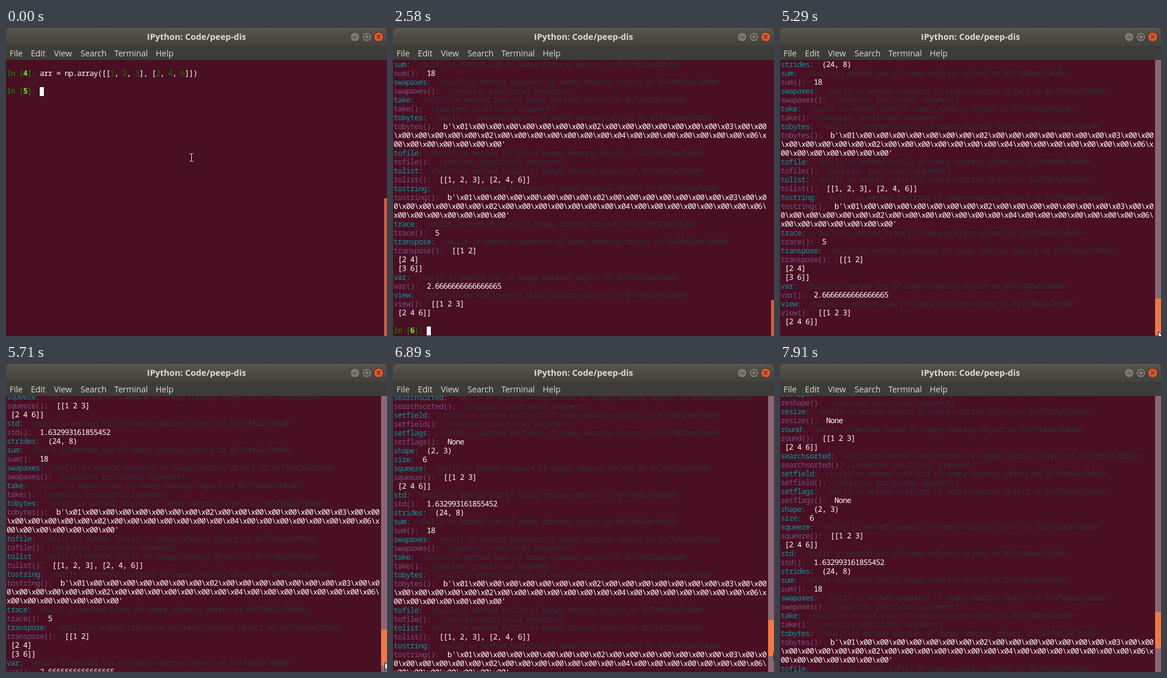
These frames come from a looping animation (644 by 521 pixels, 8000 ms). An HTML page:

```html
<!DOCTYPE html>
<html lang="en">
<head>
<meta charset="utf-8">
<title>IPython terminal</title>
<style>
  html, body { margin: 0; width: 644px; height: 521px; overflow: hidden; background: #490f23; }
  #win { position: relative; width: 644px; height: 521px; overflow: hidden; background: #490f23; }
  #bar { position: absolute; inset: 0 0 auto; height: 54px; background: #7c2a24; font-family: "Open Sans", "Noto Sans", sans-serif; color: #dfdbd2; }
  #chrome { position: absolute; inset: 0; border-radius: 7px 7px 0 0; background: linear-gradient(#66645c 0, #55534b 2px, #43423d 29px, #3d3c38 31px, #3c3b37 54px); }
  #title { position: absolute; left: 0; width: 644px; top: 5px; text-align: center; font-weight: 700; font-size: 14.5px; line-height: 20px; }
  .menu { position: absolute; top: 33px; font-size: 14px; line-height: 20px; }
  #bar svg { position: absolute; left: 580px; top: 5px; }
  #term { position: absolute; left: 0; top: 54px; width: 644px; height: 466px; overflow: hidden; }
  pre { position: absolute; left: 1px; top: 0; margin: 0; color: #fff; font: 500 13px/15px "Noto Sans Mono", "DejaVu Sans Mono", monospace; letter-spacing: -.8px; text-rendering: geometricPrecision; }
  pre div { height: 15px; white-space: pre; }
  .key { color: #06989a; }
  .call { color: #75507b; }
  .dim { color: #2e3436; }
  .in { color: #009900; }
  .in b { color: #8ae234; }
  .num { color: #008000; }
  .pair { background: #aacccc; color: #000; }
  .caret { position: relative; top: 1px; display: inline-block; width: 7px; height: 15px; background: #fff; vertical-align: top; }
  #trough { position: absolute; right: 0; top: 54px; width: 10px; height: 467px; background: #8c6773; }
  #thumb { position: absolute; right: 0; }
  #beam, #arrow { position: absolute; overflow: visible; }
  #beam { left: 309px; top: 211px; }
</style>
</head>
<body>
<div id="win">
  <div id="term"><pre id="input"></pre><pre id="output"></pre></div>
  <div id="trough"></div>
  <div id="thumb"></div>
  <div id="bar">
    <div id="chrome"></div>
    <div id="title">IPython: Code/peep-dis</div>
    <svg width="60" height="20" fill="none" stroke="#35342f">
      <g fill="#7b7870"><circle cx="10" cy="10" r="8"/><circle cx="30" cy="10" r="8"/></g>
      <circle cx="50" cy="10" r="8" fill="#e9562b"/>
      <path d="M6.5 10.5h7M26.5 6.5h7v7h-7zM47 7l6 6M53 7l-6 6" stroke-width="1.2"/>
    </svg>
  </div>
  <svg id="beam" width="9" height="16" fill="none">
    <path d="M1.5 1.5H4L4.5 2L5 1.5H7.5M4.5 2V14M1.5 14.5H4L4.5 14L5 14.5H7.5" stroke="#111" stroke-width="3"/>
    <path d="M1.5 1.5H4L4.5 2L5 1.5H7.5M4.5 2V14M1.5 14.5H4L4.5 14L5 14.5H7.5" stroke="#fff"/>
  </svg>
  <svg id="arrow" width="12" height="18">
    <path d="M.5 .5V14L3.7 11L6 16.5L8.2 15.5L6 10.3H10.3Z" fill="#fff" stroke="#111"/>
  </svg>
</div>
<script>
const $ = id => document.getElementById(id);
const LOOP = 8000, COLS = 90, ROW = 15, ROWS_ABOVE = 21;
const SCROLL_RATIO = 7.6;   // text pixels per thumb pixel

const esc = s => s.replace(/&/g, '&amp;').replace(/</g, '&lt;');
const span = (cls, s) => `<span class="${cls}">${esc(s)}</span>`;
const row = html => `<div>${html}</div>`;
const prompt = n => `<span class="in">In [<b>${n}</b>]: </span>`;
const caret = '<span class="caret"></span>';

// Menu
const menu = { File: 6, Edit: 42, View: 81, Search: 126, Terminal: 183, Help: 253 };
for (const name in menu)
  $('bar').insertAdjacentHTML('beforeend', `<span class="menu" style="left:${menu[name]}px">${name}</span>`);

// Output listing
const NEEDS_ARG = '(requires positional argument)';
const matrix = '[[1 2 3]\n [2 4 6]]';
const bytes = "b'" + [1, 2, 3, 2, 4, 6].map(n => '\\x0' + n + '\\x00'.repeat(7)).join('') + "'";
const methods = [
  ['reshape'], ['resize', 'None'], ['round', matrix], ['searchsorted'], ['setfield'],
  ['setflags', 'None'], ['shape', '(2, 3)', true], ['size', '6', true], ['squeeze', matrix],
  ['std', '1.632993161855452'], ['strides', '(24, 8)', true], ['sum', '18'], ['swapaxes'],
  ['take'], ['tobytes', bytes], ['tofile'], ['tolist', '[[1, 2, 3], [2, 4, 6]]'],
  ['tostring', bytes], ['trace', '5'], ['transpose', '[[1 2]\n [2 4]\n [3 6]]'],
  ['var', '2.6666666666666665'], ['view', matrix]
];

function entry(cls, label, value, valueCls) {
  const head = label + ':  ';
  return (head + value).split('\n')
    .flatMap(line => line.match(new RegExp(`.{1,${COLS}}`, 'g')))
    .map((line, i) => row(i ? span(valueCls, line)
      : span(cls, head) + span(valueCls, line.slice(head.length))))
    .join('');
}

const listing = methods.map(([name, value, isField]) => {
  if (isField) return entry('key', name, value, '');
  const about = `<built-in method ${name} of numpy.ndarray object at 0x7fdd2ae7b8a0>`;
  return entry('key', name, about, 'dim') +
    entry('call', name + '()', value || NEEDS_ARG, value ? '' : 'dim');
}).join('');
$('output').innerHTML = listing + row('') + row(prompt(6) + caret);
const outCaret = $('output').querySelector('.caret');

const code = 'arr = np.array([[1, 2, 3], [2, 4, 6]])'.replace(/\d/g, d => span('num', d));
const typedRow = text => {
  const body = text.endsWith(')') ? text.replace(/[()]/g, c => span('pair', c)) : text;
  return row('') + row(prompt(4) + code) + row('') + row(prompt(5) + body + caret);
};

// Timelines: [start, value]
const typing = [[0, ''], [780, 'p'], [920, 'pe'], [1040, 'pee'], [1160, 'peep'],
  [1440, 'peep('], [1730, 'peep(ar'], [1880, 'peep(arr'], [2180, 'peep(arr)']];
const blink = [[0, 1], [3140, 0], [3700, 1], [4340, 0], [4890, 1]];
const hover = [[0, 0], [4100, .35], [4220, .7], [4340, 1]];
const drag = [[0, 0], [5290, 2], [5440, 5], [5590, 8], [5710, 11], [5830, 13], [5950, 15],
  [6100, 17], [6220, 18], [6360, 20], [6500, 22], [6650, 24], [6770, 25], [6890, 27],
  [7040, 29], [7190, 31], [7370, 33], [7500, 35], [7650, 37], [7790, 38], [7910, 40]];
const pointerX = [[0, 644], [4100, 642], [4220, 640], [4340, 639], [4460, 638],
  [5290, 639], [5710, 639.5], [6220, 640], [6500, 642], [6770, 643], [7040, 644]];

const at = (steps, t) => steps.findLast(s => s[0] <= t)[1];
let shown = null;

function draw(t) {
  const done = t >= 2580, over = at(hover, t), moved = at(drag, t), text = at(typing, t);
  if (text !== shown) $('input').innerHTML = typedRow(shown = text);
  $('input').style.display = done ? 'none' : '';
  $('output').style.display = done ? '' : 'none';
  $('output').style.top = -ROWS_ABOVE * ROW + Math.round(moved * SCROLL_RATIO) + 'px';
  outCaret.style.opacity = at(blink, t);

  $('beam').style.display = t < 780 ? '' : 'none';
  const x = at(pointerX, t);
  $('arrow').style.display = x < 644 ? '' : 'none';
  $('arrow').style.left = x + 'px';
  $('arrow').style.top = 515 - moved + 'px';

  $('trough').style.opacity = over;
  const bar = $('thumb').style;
  bar.top = (done ? 460 - moved : 288) + 'px';
  bar.height = (done ? 61 : 233) + 'px';
  bar.width = 5 + Math.round(5 * over) + 'px';
  bar.background = t >= 4740 ? '#f37746' : over ? '#dd7350' : '#cb5c46';
}

const start = performance.now();
function tick() {
  draw((performance.now() - start) % LOOP);
  requestAnimationFrame(tick);
}
tick();
</script>
</body>
</html>
```
